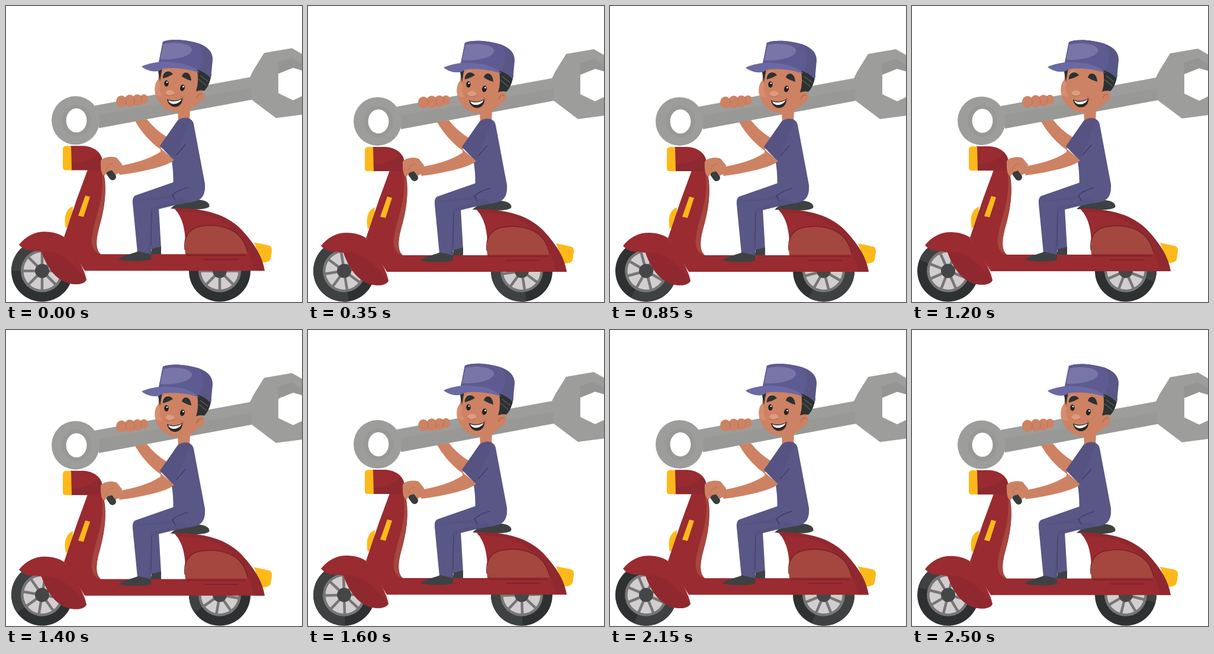
Animation of 500x500 px, one loop 2550 ms. Source, as an HTML page:

```html
<!DOCTYPE html>
<html lang="en">
<head>
<meta charset="utf-8">
<title>Mechanic on a scooter</title>
<style>
  html, body { margin: 0; width: 100%; height: 100%; overflow: hidden; background: #fff; }
  svg { display: block; width: 100vw; height: 100vh; }
  .red { fill: #992b31; } .deep { fill: #8b282e; } .rose { fill: #a4473f; }
  .yellow { fill: #fdb91a; } .dark { fill: #2d3132; } .coal { fill: #3e4142; }
  .cloth { fill: #595786; } .shade { fill: #504e7b; }
  .skin { fill: #cd8263; } .glow { fill: #df9b7d; }
  .steel { fill: #9d9d9b; } .iron { fill: #959593; }
  .line { fill: none; stroke-linecap: round; stroke-linejoin: round; }
</style>
</head>
<body>
<svg viewBox="0 0 500 500" preserveAspectRatio="xMidYMid meet">
  <g id="wheels"></g>

  <g id="ride">
    <!-- wrench -->
    <path class="steel" d="M150 168L412 120L418 108L436 79L483 71L502 82V109L485 104L460 114V147L485 159L502 151V183L456 189L415 158L157 206Z"/>
    <path class="iron" d="M157 183L414 138L415 158L157 206Z" opacity=".6"/>
    <path class="iron" d="M459 95L483 87L502 99V109L485 104L460 114Z"/>
    <path class="steel" fill-rule="evenodd" d="M77 193a40.5 41 0 1 0 81 0a40.5 41 0 1 0 -81 0ZM101.500 193a17.500 20.500 0 1 1 35 0a17.500 20.500 0 1 1 -35 0Z"/>
    <path class="iron" fill-rule="evenodd" d="M94 193a25 27 0 1 0 50 0a25 27 0 1 0 -50 0ZM101.500 193a17.500 20.500 0 1 1 35 0a17.500 20.500 0 1 1 -35 0Z" opacity=".6"/>

    <!-- far arm -->
    <path class="skin" d="M218 194L238 191Q252 209 272 221L261 242C243 229 229 213 218 194Z"/>
    <g class="skin">
      <ellipse cx="195" cy="161" rx="9" ry="10"/>
      <ellipse cx="209" cy="160" rx="9" ry="10.500"/>
      <ellipse cx="222" cy="159" rx="9" ry="10"/>
      <ellipse cx="233" cy="157" rx="7" ry="8"/>
    </g>
    <path class="line" d="M201 155Q205 160 202 166M215 154Q219 159 216 166M228 152Q231 157 228 163" stroke="#b87054" stroke-width="1"/>

    <!-- far leg -->
    <path class="cloth" d="M244 342L258 340L262 408L245 411Z"/>
    <path class="coal" d="M246 410L262 406V420L244 422Z"/>

    <!-- scooter -->
    <path class="yellow" d="M113 338C101 343 97 356 101 375L112 365Z"/>
    <path class="yellow" d="M419 399L443 404Q450 405 449 414L447 427Q445 433 432 433Z"/>
    <path class="coal" d="M278 342C289 330 309 326 326 327C341 328 345 335 343 339C334 345 311 344 278 342Z"/>
    <path class="red" d="M138 276H163C173 304 166 345 157 375C151 398 152 412 160 419H303C304 383 301 360 284 341C336 341 374 352 399 379C421 403 433 423 437 447H133L98 390L120 325Z"/>
    <path class="rose" d="M161 277C173 304 166 345 157 375C151 398 152 412 160 419C147 416 142 403 146 384C152 351 168 322 161 277Z"/>
    <path class="deep" d="M284 341C336 341 374 352 399 379C421 403 433 423 437 447H419C413 417 400 391 375 371C349 351 320 347 288 347Z" opacity=".6"/>
    <path class="rose" d="M303 418C300 396 305 380 323 374C350 367 382 373 397 392Q405 403 408 418Z"/>
    <path class="line" d="M302 411C300 392 306 379 323 373C350 366 382 372 397 391Q405 402 408 415M306 421H404M335 428H392" stroke="#752128" stroke-width="1.300"/>
    <path class="yellow" d="M134 320L142 322L131 356L122 354Z"/>
    <path class="red" d="M22 403C34 388 49 381 65 381C80 381 91 385 98 390C117 418 132 442 136 462C132 471 116 471 105 468C82 461 68 438 60 415C46 411 34 417 22 403Z"/>
    <path class="deep" d="M60 415C72 413 87 416 99 425C115 437 126 449 136 462C132 471 116 471 105 468C82 461 68 438 60 415Z" opacity=".6"/>
    <path class="red" d="M109 236H130C149 237 161 247 163 261V277H109Z"/>
    <path class="deep" d="M109 266C128 265 145 261 156 248Q163 256 163 277H109Z" opacity=".7"/>
    <path class="yellow" d="M98 237Q103 235 110 237L111 277H100Q96 277 96 272V240Z"/>
    <path class="line" d="M175 281L180 288" stroke="#393c3d" stroke-width="12"/>

    <!-- near leg and body -->
    <path class="cloth" d="M284 297L218 320Q213 323 214 333L222 416L245 419L246 346C267 340 286 335 314 331C332 328 337 319 336 300Z"/>
    <path class="shade" d="M214 329C236 325 262 324 284 317L286 329L246 340L240 419L245 419L246 346L310 331L300 324Z" opacity=".4"/>
    <path class="line" d="M246 346L245 405" stroke="#434169" stroke-width="1.200"/>
    <path class="coal" d="M190 428C200 420 215 418 223 414L245 419V428C230 432 205 431 190 428Z"/>
    <path class="skin" d="M290 174H311L310 195L291 196Z"/>
    <path class="cloth" d="M290 193C299 186 315 187 317 199L336 300C337 318 328 328 311 328L283 314C282 297 284 283 279 256L260 236Z"/>
    <path class="shade" d="M290 193C299 186 308 188 311 190C305 207 299 224 284 258L260 236Z" opacity=".4"/>
    <path class="line" d="M303 234L288 251M307 306Q288 312 281 319M281 319L286 328" stroke="#38375f" stroke-width="1.200"/>

    <!-- near arm -->
    <path class="skin" d="M261 240L284 260C274 270 231 280 192 285L185 271C216 266 241 259 261 246Z"/>
    <path class="skin" d="M160 261C165 254 180 253 187 256L196 267L194 280L185 285L180 277L172 279L166 287C159 282 160 270 160 261Z"/>
    <path class="line" d="M181 265L173 268L169 277" stroke="#b87054" stroke-width="1"/>

    <!-- head -->
    <ellipse class="skin" cx="327" cy="152" rx="8" ry="10" transform="rotate(15 327 152)"/>
    <path class="skin" d="M260 98L327 103L324 145L329 159C319 172 304 180 287 179C269 177 257 165 253 151C250 141 251 130 257 124Z"/>
    <path class="glow" d="M257 124L261 132C257 140 262 147 265 152Q257 153 253 149C250 141 252 130 257 124ZM263 119L277 108L270 107L262 114Z" opacity=".5"/>
    <path class="dark" d="M256 104H264L260 127Z"/>
    <path class="dark" d="M322 104L347 115C345 129 340 138 335 143Q328 141 321 144Q327 126 322 104Z"/>
    <path class="line" d="M328 117L341 127M326 124L338 134" stroke="#56595a" stroke-width="1.500"/>
    <path class="line" d="M322 155Q326 146 331 149" stroke="#aa654b" stroke-width="1.200"/>
    <path class="cloth" d="M257 100L265 60C280 54 306 57 326 63Q350 72 349 91L346 122C337 112 327 108 318 106C300 101 277 102 257 104Z"/>
    <path fill="#5d5b91" d="M257 100L265 60C280 54 306 57 326 63C336 80 334 94 326 108C306 101 282 102 257 104Z"/>
    <path fill="#7875a8" d="M261 86L266 64C290 59 311 64 314 72C316 82 295 91 261 90Z"/>
    <path fill="#6b69a3" d="M229 102C242 96 260 93 273 94C300 95 318 102 327 112C303 105 281 103 264 106C257 113 240 111 229 102Z"/>
    <g id="brows" class="dark">
      <path d="M265 122C264 111 275 106 282 115Q274 120 265 122Z"/>
      <path d="M297 119C299 109 312 109 313 126Q305 124 297 119Z"/>
    </g>
    <g id="eyes">
      <ellipse cx="271" cy="130.500" rx="3.700" ry="5.300" fill="#222"/>
      <ellipse cx="298" cy="138" rx="3.900" ry="5.500" fill="#222" transform="rotate(15 298 138)"/>
      <circle cx="272" cy="128.500" r="1.300" fill="#fff"/>
      <circle cx="299.500" cy="136" r="1.400" fill="#fff"/>
    </g>
    <ellipse class="glow" cx="277" cy="147" rx="7.500" ry="5.500"/>
    <path class="line" d="M270 149Q276 154 284 149M296 152Q300 154 300 158" stroke="#aa654b" stroke-width="1.100"/>
    <path d="M272 157C280 161 291 160 298 155C299 167 288 173 280 169Q273 165 272 157Z" fill="#292727"/>
    <path d="M274 159C281 162 290 161 297 157C294 163 287 166 281 165Q275 163 274 159Z" fill="#fff"/>
  </g>
</svg>
<script>
  const LOOP = 2550, STEP = 50, BOB = LOOP / 5, TURN = LOOP / 2;
  const el = id => document.getElementById(id);
  const ride = el("ride"), eyes = el("eyes"), brows = el("brows");

  function wheel(x, y) {
    const spokes = Array.from({ length: 4 }, (_, i) =>
      `<path d="M0 -33V33" transform="rotate(${i * 45})"/>`).join("");
    return `<g transform="translate(${x} ${y})"><g class="spin">
      <circle r="52" class="dark"/>
      <path class="coal" d="M-52 0A52 52 0 0 1 52 0Z"/>
      <circle r="36" fill="#777676"/>
      <circle r="31.500" fill="#d2cecf"/>
      <g stroke="#777676" stroke-width="4.500">${spokes}</g>
      <circle r="12" fill="#454647"/></g></g>`;
  }
  el("wheels").innerHTML = wheel(61, 447.5) + wheel(361, 447.5);
  const spins = document.querySelectorAll(".spin");

  function draw(ms) {
    const t = Math.floor(ms % LOOP / STEP) * STEP;
    const bob = 1 - Math.cos(2 * Math.PI * (t / BOB - 0.12));
    const angle = -360 * t / TURN;
    const blink = t >= 1150 && t < 1300;
    ride.setAttribute("transform", `translate(0 ${bob.toFixed(2)})`);
    spins.forEach(s => s.setAttribute("transform", `rotate(${angle.toFixed(2)})`));
    eyes.setAttribute("visibility", blink ? "hidden" : "visible");
    brows.setAttribute("transform", `translate(0 ${blink ? 1 : 0})`);
  }

  const start = performance.now();
  function tick() {
    draw(performance.now() - start);
    requestAnimationFrame(tick);
  }
  draw(0);
  requestAnimationFrame(tick);
</script>
</body>
</html>
```
